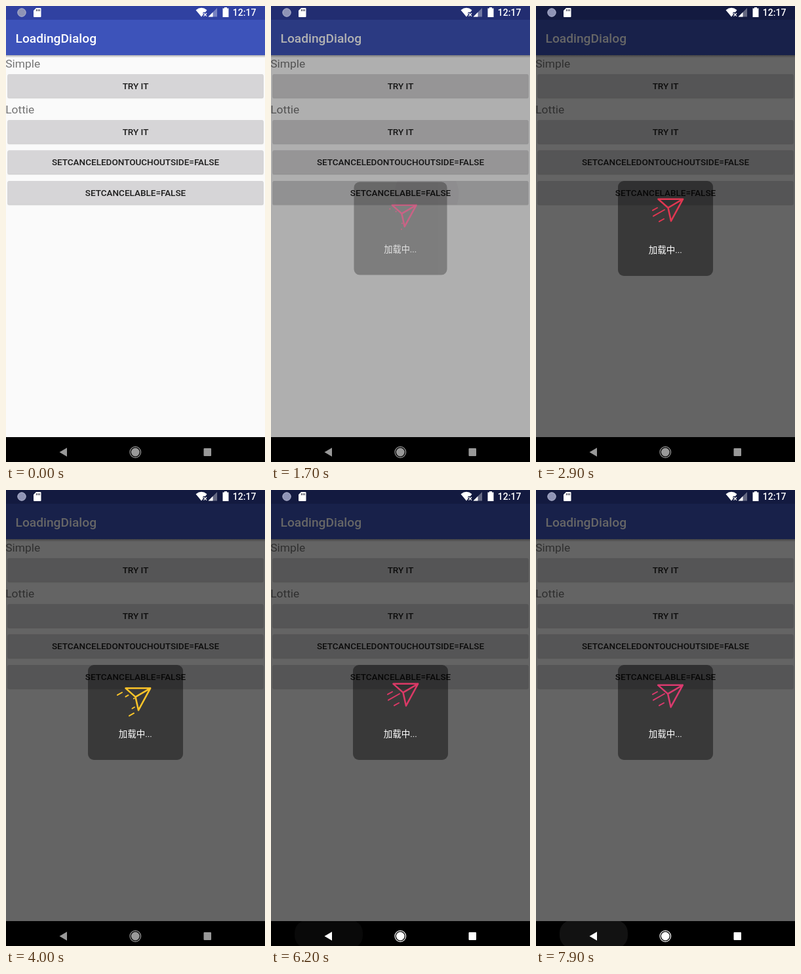
An HTML page for the animation above (8 s loop, 395x696 px).

```html
<!DOCTYPE html>
<html lang="zh-CN">
<head>
<meta charset="utf-8">
<title>LoadingDialog</title>
<style>
html, body { margin: 0; width: 100%; height: 100%; overflow: hidden; background: #fafafa; }
svg { display: block; }
text { font-family: Roboto, "Noto Sans CJK SC", "Noto Sans CJK", sans-serif; }
.label { font-size: 17.4px; fill: #757575; }
.btn { font-size: 13.5px; font-weight: 500; fill: #1c1c1c; text-anchor: middle; }
#plane, #streaks { fill: none; stroke-linecap: round; stroke-linejoin: round; }
#plane { stroke-width: 2.5; }
#streaks { stroke-width: 2; }
</style>
</head>
<body>
<svg width="395" height="696" viewBox="0 0 395 696">
  <defs>
    <linearGradient id="shade" x2="0" y2="1">
      <stop stop-opacity=".3"/><stop offset="1" stop-opacity="0"/>
    </linearGradient>
  </defs>
  <rect width="395" height="696" fill="#fafafa"/>
  <rect y="75" width="395" height="4" fill="url(#shade)"/>
  <rect width="395" height="75" fill="#3d53ba"/>
  <rect width="395" height="21" fill="#3041a1"/>
  <text x="14.5" y="56" font-size="19.2" font-weight="500" fill="#fff">LoadingDialog</text>
  <text class="label" x="-.8" y="94">Simple</text>
  <text class="label" x="-.8" y="163.5">Lottie</text>
  <g id="buttons"></g>
  <svg x="2.5" y="267" width="390" height="36">
    <g id="touch" opacity="0">
      <rect width="390" height="36" rx="2" fill-opacity=".04"/>
      <circle cx="235" cy="20" r="49" fill-opacity=".04"/>
    </g>
  </svg>
  <rect id="dim" width="395" height="658" opacity="0"/>

  <g id="dialog">
    <rect x="125" y="267" width="145" height="145" rx="9" fill-opacity=".43"/>
    <path id="plane" d="M0 0H37.7L19.5 33.5 15 13.3ZM15 13.3L37.7 0"/>
    <path id="streaks"/>
    <text x="197.3" y="377" font-size="13.45" fill="#fff" text-anchor="middle">加载中...</text>
  </g>

  <!-- status bar -->
  <g fill="#fff">
    <circle cx="24" cy="10" r="6.2" fill="#8f94b6" stroke="#b4b8d2"/>
    <path d="M46 3H52.5Q53.5 3 53.5 4V16Q53.5 17 52.5 17H43Q42 17 42 16V7Z"/>
    <path d="M46.5 5v3M48.9 5v3M51.2 5v3" stroke="#334" stroke-width="1.1"/>
    <path d="M289.5 6.2Q298 -.5 306.5 6.2L304 9.4H300.5V13.5L298 16.5Z"/>
    <path d="M301.5 11l4.5 4.6M306 11l-4.5 4.6" stroke="#fff" stroke-width="1.3"/>
    <path d="M322 3V16.5H308.5Z" opacity=".35"/>
    <path d="M315.5 9.5V16.5H308.5Z"/>
    <path d="M333 2H337V3.6H339.5V17H330.5V3.6H333Z"/>
    <text x="345.8" y="15" font-size="14" font-weight="500">12:17</text>
  </g>

  <!-- navigation bar -->
  <rect y="658" width="395" height="38"/>
  <svg y="658" width="395" height="38">
    <rect id="ripple" x="-52" y="-22" width="104" height="44" rx="20" fill="#fff" opacity="0"/>
  </svg>
  <g id="keys">
    <path d="M81.5 681L93 674.3V687.7Z"/>
    <circle cx="197.3" cy="681" r="6.4"/>
    <circle cx="197.3" cy="681" r="8.3" fill="none" stroke="currentColor" stroke-width="1.2"/>
    <rect x="301.5" y="675" width="11.5" height="12" rx="1"/>
  </g>
</svg>
<script>
const LOOP = 8000, OPEN = 1600, CYCLE = 1600;
const PRESS = 5800, PRESS_GAP = 630;
const $ = id => document.getElementById(id);
const ramp = (t, from, to) => Math.max(0, Math.min(1, (t - from) / (to - from)));
const smooth = v => v * v * (3 - 2 * v);
// cosine over one flight cycle, highest at the given time
const wave = (t, peak) => Math.cos((t - peak) / CYCLE * 2 * Math.PI);

const button = (y, label) => `
  <rect x="2" y="${y + .8}" width="391" height="36.8" rx="2.5" fill-opacity=".07"/>
  <rect x="2.5" y="${y + .5}" width="390" height="36" rx="2" fill-opacity=".14"/>
  <rect x="2.5" y="${y}" width="390" height="35.7" rx="2" fill="#d6d5d7"/>
  <text class="btn" x="197.5" y="${y + 22.7}">${label}</text>`;
$('buttons').innerHTML = button(104, 'TRY IT') + button(174, 'TRY IT')
  + button(220.3, 'SETCANCELEDONTOUCHOUTSIDE=FALSE') + button(267, 'SETCANCELABLE=FALSE');

// right end and horizontal length while trailing, then while tucked in (negative is hidden)
const streaks = [
  { trail: [177, 309, 7], tuck: [185, 308, 7] },
  { trail: [186.5, 313.2, 4], tuck: [196, 311, 17] },
  { trail: [195, 340.7, 7], tuck: [195, 325, 7] },
  { trail: [196, 331.5, 3.5], tuck: [199, 324, -1] },
  { trail: [195.5, 318, .6], tuck: [198, 314, -1] }
];

function streakPath({ trail, tuck }, t) {
  const grow = ramp(t, 200, 700) * ramp(t, 1600, 1500);
  const fold = smooth(ramp(t, 800, 1300));
  const [x, y, len] = trail.map((v, i) => v + (tuck[i] - v) * fold);
  if (t < 100 || len < 0) return '';
  const dx = len * grow;
  return `M${x + 4 * (1 - grow)} ${y}l${-dx} ${dx * .57}`;
}

function drawPlane(t) {
  const warm = (.5 + .5 * wave(t, 850)) ** 2;
  const color = `hsl(${340 + 65 * warm}, ${68 + 32 * warm}%, ${54 + 4 * warm}%)`;
  const x = 183.9 - 2.6 * wave(t, 550), y = 301.5 + 7 * wave(t, 440);
  $('plane').setAttribute('transform', `translate(${x} ${y})`);
  $('plane').setAttribute('stroke', color);
  $('streaks').setAttribute('stroke', color);
  $('streaks').setAttribute('d', streaks.map(s => streakPath(s, t)).join(''));
}

function drawKeys(t) {
  const color = `hsl(0, 0%, ${60 + 40 * ramp(t, PRESS, PRESS + 400)}%)`;
  $('keys').setAttribute('fill', color);
  $('keys').style.color = color;
  // repeated presses of the back key
  const age = t < PRESS ? Infinity : (t - PRESS) % PRESS_GAP;
  $('ripple').setAttribute('transform', `translate(88 20) scale(${.5 + .5 * ramp(age, 0, 200)})`);
  $('ripple').setAttribute('opacity', .07 * ramp(age, 0, 100) * ramp(age, 550, 250));
}

function render(t) {
  const open = t - OPEN, shown = open >= 0, enter = ramp(open, 0, 200);
  $('touch').setAttribute('opacity', shown ? ramp(open, 300, 0) : 0);
  $('dim').setAttribute('opacity', .6 * enter);
  $('dialog').setAttribute('opacity', shown ? .3 + .7 * enter : 0);
  $('dialog').setAttribute('transform', `translate(197.5 339.5)
    scale(${.93 + .07 * Math.sin(enter * Math.PI / 2)}) translate(-197.5 -339.5)`);
  if (shown) drawPlane(open % CYCLE);
  drawKeys(t);
}

const start = performance.now();
function tick() {
  const t = (performance.now() - start) % LOOP;
  render(Math.floor(t / 100) * 100); // ten steps a second
  requestAnimationFrame(tick);
}
tick();
</script>
</body>
</html>
```
